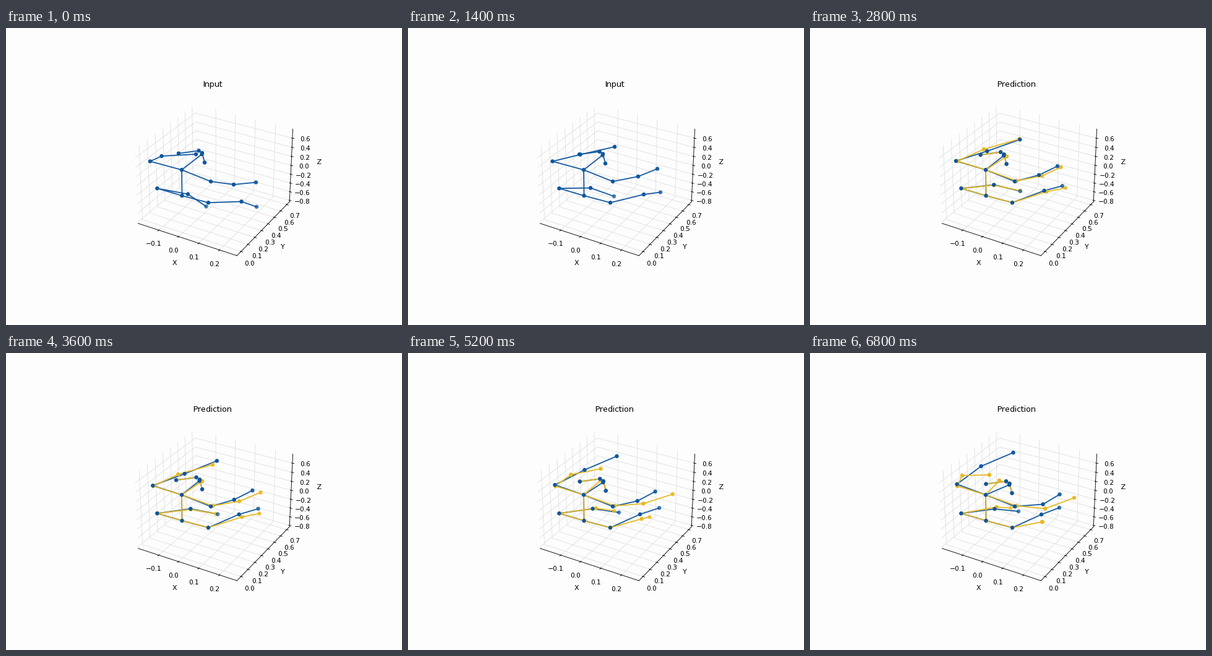
Write a matplotlib script that moves like this. It is 640 px wide and 480 px high and loops after 7 s.

```python
import numpy as np
import matplotlib.pyplot as plt
from matplotlib.animation import FuncAnimation
from matplotlib.collections import LineCollection

W, H, DPI = 640, 480, 80
FRAMES, INPUT_FRAMES = 35, 10
PAPER, GRID = "#fdfdfd", "#e0e0e0"
BLUE, YELLOW = "#0f569f", "#e8b81e"

CHAINS = [
    "spine shoulder_l elbow_l hand_l",
    "spine shoulder_r elbow_r hand_r",
    "spine neck nose brow crown",
    "nose chin",
    "spine pelvis",
    "pelvis hip_l knee_l foot_l",
    "pelvis hip_r knee_r foot_r",
]
FADE = {"foot_l": 0.75, "foot_r": 0.8, "hand_r": 0.92}  # far joints look paler

# Stage positions in pixels. Still joints have one point, the head is rigid.
STILL = {"spine": (284, 229.3), "pelvis": (284.5, 271), "hip_l": (244.4, 259.2),
         "hip_r": (327, 282.3), "shoulder_r": (331, 248)}
HEAD = {"neck": (-0.5, 2), "nose": (0, 0), "brow": (-5.5, -3.7),
        "crown": (-38, 0.7), "chin": (4, 15.5)}

TRUE_TIMES = [0, 7, 20, 34]
NOSE = [(317, 202), (315, 203.5), (313, 205), (322.5, 211)]
TRUE_KEYS = {
    "shoulder_l": [(233, 215.5), (233.5, 215.5), (237.5, 214), (237.5, 212)],
    "elbow_l": [(251.5, 207), (278.5, 204.5), (289, 193.5), (276.5, 183)],
    "hand_l": [(307, 204), (334, 192), (341, 172), (328.5, 161)],
    "elbow_r": [(368, 253), (372, 240), (368.5, 237), (376.5, 244.5)],
    "hand_r": [(404, 249.5), (403, 227.5), (398, 222), (403.5, 228.5)],
    "knee_l": [(294, 268.5), (295, 258.5), (298.5, 251.5), (298.5, 252)],
    "foot_l": [(323.5, 288.5), (333, 272), (342.5, 259.5), (337, 256)],
    "knee_r": [(380.5, 280.5), (381, 269), (376, 260.5), (374, 261)],
    "foot_r": [(405, 289), (408, 265.5), (407.5, 251), (403, 250)],
}

# The guess leaves the true pose at the last input frame.
GUESS_TIMES = [INPUT_FRAMES - 1, 14, 30, 34]
GUESS_KEYS = {
    "neck": [(318, 207.5), (309, 205.5), (306, 206)],
    "elbow_l": [(281, 196), (255, 197), (246, 198)],
    "hand_l": [(338, 179.5), (300, 191), (290, 197)],
    "elbow_r": [(375, 239), (381, 246), (380, 251.5)],
    "hand_r": [(405.5, 225), (431, 230), (427, 234)],
    "knee_l": [(297, 254), (304.5, 250), (301.5, 249)],
    "foot_l": [(340, 263), (330, 253), (324.5, 250.5)],
    "knee_r": [(382, 264.5), (376, 270), (375, 273)],
    "foot_r": [(413, 258.5), (382, 268.5), (376, 273)],
}


def track(times, keys):
    """Smooth path through the keys without overshoot, one point per frame."""
    t, p = np.array(times, float), np.array(keys, float)
    step = np.diff(p, axis=0) / np.diff(t)[:, None]
    before, after = step[:-1], step[1:]
    total = before + after
    inner = 2 * np.maximum(before * after, 0) / np.where(total == 0, 1, total)
    slope = np.vstack([step[:1], inner, step[-1:]])

    frame = np.clip(np.arange(FRAMES), t[0], t[-1])
    i = np.clip(np.searchsorted(t, frame, side="right") - 1, 0, len(t) - 2)
    span = (t[i + 1] - t[i])[:, None]
    u = (frame - t[i])[:, None] / span
    ease = u * u * (3 - 2 * u)
    return (p[i] + ease * (p[i + 1] - p[i])
            + u * (1 - u) * span * ((1 - u) * slope[i] - u * slope[i + 1]))


def still(point):
    return np.tile(np.array(point, float), (FRAMES, 1))


nose = track(TRUE_TIMES, NOSE)
true_pose = {name: still(point) for name, point in STILL.items()}
true_pose.update({name: nose + shift for name, shift in HEAD.items()})
true_pose.update({name: track(TRUE_TIMES, keys)
                  for name, keys in TRUE_KEYS.items()})

guess_pose = dict(true_pose, shoulder_l=still((238, 215)),
                  shoulder_r=still((334, 247)))
for name, keys in GUESS_KEYS.items():
    start = tuple(true_pose[name][INPUT_FRAMES - 1])
    guess_pose[name] = track(GUESS_TIMES, [start] + keys)


class Skeleton:
    def __init__(self, ax, pose, color, line_z, dot_z):
        self.pose = pose
        self.lines = LineCollection([], colors=color, linewidths=1.7,
                                    alpha=0.95, zorder=line_z)
        ax.add_collection(self.lines, autolim=False)
        self.dots = ax.scatter(*self.points(0).T, s=34, c=color, linewidths=0,
                               alpha=[FADE.get(n, 1) for n in pose], zorder=dot_z)

    def points(self, frame):
        return np.array([path[frame] for path in self.pose.values()])

    def update(self, frame):
        self.lines.set_segments([[self.pose[n][frame] for n in chain.split()]
                                 for chain in CHAINS])
        self.dots.set_offsets(self.points(frame))

    def show(self, visible):
        self.lines.set_visible(visible)
        self.dots.set_visible(visible)


plt.rcParams.update({"font.family": "DejaVu Sans", "grid.color": GRID,
                     "text.hinting_factor": 1})
fig = plt.figure(figsize=(W / DPI, H / DPI), dpi=DPI, facecolor=PAPER)

room = fig.add_axes([0.221875, 0.196, 0.600625, 0.5929], projection="3d")
room.set_facecolor("none")
room.set(xticks=np.arange(-1, 3) / 10, yticks=np.arange(8) / 10,
         zticks=np.arange(-4, 4) / 5)
room.set(xlim=(-0.207, 0.283), ylim=(-0.057, 0.747), zlim=(-0.833, 0.796),
         xlabel="X", ylabel="Y", zlabel="Z")
for axis in (room.xaxis, room.yaxis, room.zaxis):
    axis.set_pane_color((1, 1, 1, 0))
title = room.set_title("Input")

stage = fig.add_axes([0, 0, 1, 1])
stage.axis("off")
truth = Skeleton(stage, true_pose, BLUE, 1, 4)
guess = Skeleton(stage, guess_pose, YELLOW, 2, 3)
stage.set(xlim=(0, W), ylim=(H, 0))


def draw(frame):
    predicting = frame >= INPUT_FRAMES
    title.set_text("Prediction" if predicting else "Input")
    truth.update(frame)
    guess.update(frame)
    guess.show(predicting)
    return title, truth.lines, truth.dots, guess.lines, guess.dots


anim = FuncAnimation(fig, draw, frames=FRAMES, interval=200, repeat=True,
                     repeat_delay=0, blit=False)
plt.show()
```
